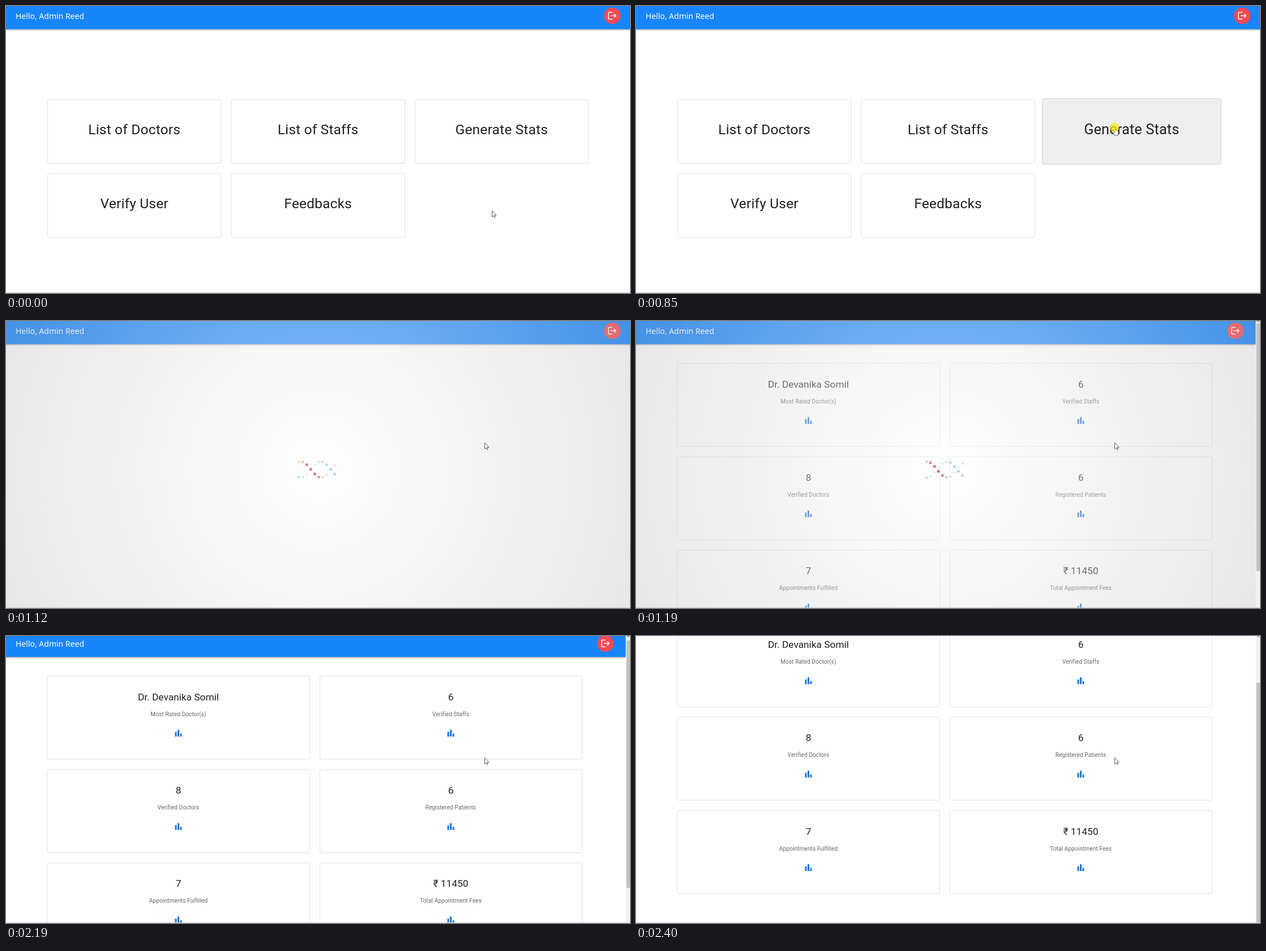
Write an HTML page that moves like this. It is 1102 by 508 pixels and loops after 2940 ms.

```html
<!DOCTYPE html>
<html lang="en">
<head>
<meta charset="utf-8">
<title>Admin dashboard</title>
<style>
  html, body { margin: 0; width: 100%; height: 100%; overflow: hidden; background: #fefefe; }
  #stage { position: relative; width: 1102px; height: 508px; overflow: hidden; background: #fefefe; }
  #stage > * { position: absolute; left: 0; top: 0; }
  svg { display: block; }
  text { font-family: Roboto, sans-serif; fill: #212121; text-anchor: middle; }
  .hello { font: 14px "Noto Sans", "Open Sans", sans-serif; fill: #fff; text-anchor: start; }
  .big { font-size: 24.5px; letter-spacing: .18px; }
  .value { font-size: 17.3px; }
  .label { font-size: 10.08px; letter-spacing: .108px; fill: #666; }
  .card { fill: none; stroke: #e2e2e2; }
  .icon { fill: #1976d2; }
  #bar { filter: drop-shadow(0 1px 1.5px rgba(0, 0, 0, .45)); }
  #overlay { height: 526px; background: radial-gradient(circle, rgba(255, 255, 255, .5), rgba(175, 175, 175, .285)); }
</style>
</head>
<body>
<div id="stage">
  <svg id="pages" width="1102" height="508">
    <g id="home"></g>
    <g id="scroller">
      <g id="stats"></g>
      <g id="header">
        <rect id="bar" x="-10" y="-10" height="51" fill="#1885fb"/>
        <text class="hello" x="17" y="22.5">Hello, Admin Reed</text>
        <g id="logout">
          <circle cy="17.3" r="14.6" fill="#fa4a52"/>
          <path fill="#fff" transform="translate(-9 8.3) scale(.75)" d="M17 7l-1.41 1.41L18.17 11H8v2h10.17l-2.58 2.58L17 17l5-5zM4 5h8V3H4c-1.1 0-2 .9-2 2v14c0 1.1.9 2 2 2h8v-2H4z"/>
        </g>
      </g>
    </g>
  </svg>
  <div id="overlay"></div>
  <svg width="1102" height="508">
    <g id="spinner"></g>
    <g id="scrollbar">
      <rect x="1094.5" width="8" height="508" fill="#f1f1f1"/>
      <path d="M1097 1.2h4l-1-1.2h-2z" fill="#606060"/>
      <rect id="thumb" x="1095.7" width="6.3" height="438" fill="#c1c1c1"/>
    </g>
    <rect y="507" width="1102" height="1" fill="#cfcfcf"/>
    <path id="arrow" d="M0 0V11L2.5 8.8 4.1 12.2 5.7 11.5 4.2 8.1H7.4Z" fill="#fff" stroke="#333" stroke-width=".8"/>
    <path id="hand" d="M-.9 7V1Q0-.6 1 1V5L5 6Q6 6.3 6 7.5V10L4.8 14H-.5L-3.5 9.5Q-4-.2-.9 9Z" fill="#fff" stroke="#333" stroke-width=".8"/>
    <circle id="click" r="8.3" fill="#f7ee10" opacity=".72"/>
  </svg>
</div>
<script>
const LOOP = 2940;
const $ = id => document.getElementById(id);

function add(parent, tag, attrs, text) {
  const node = document.createElementNS("http://www.w3.org/2000/svg", tag);
  for (const key in attrs) node.setAttribute(key, attrs[key]);
  if (text) node.textContent = text;
  return parent.appendChild(node);
}

function show(id, on) { $(id).style.display = on ? "" : "none"; }
function place(id, x, y) { $(id).setAttribute("transform", `translate(${x} ${y})`); }

function homeCard(title, i) {
  const x = 73.5 + (i % 3) * 324.3, y = 165.5 + Math.floor(i / 3) * 131.2;
  const g = add($("home"), "g", {});
  const box = add(g, "rect", { class: "card", x, y, width: 306.5, height: 113, rx: 3 });
  add(g, "text", { class: "big", x: x + 153.2, y: y + 61.5 }, title);
  return { g, box, cx: x + 153.2, cy: y + 56.2 };
}

function statCard([value, label], i) {
  const right = i % 2, x = right ? 554.5 : 72.5, cx = right ? 785.5 : 304.5;
  const y = 75 + Math.floor(i / 2) * 165.3;
  const g = $("stats");
  add(g, "rect", { class: "card", x, y, width: right ? 463 : 464, height: 147, rx: 3 });
  add(g, "text", { class: "value", x: cx, y: y + 42.7 }, value);
  add(g, "text", { class: "label", x: cx, y: y + 70.8 }, label);
  add(g, "path", { class: "icon", d: "M4 9h4v11H4zM10 4h4v16h-4zM16 13h4v7h-4z",
    transform: `translate(${cx - 9} ${y + 92}) scale(.75)` });
}

const cards = ["List of Doctors", "List of Staffs", "Generate Stats", "Verify User", "Feedbacks"].map(homeCard);
const hot = cards[2];
[["Dr. Devanika Somil", "Most Rated Doctor(s)"], ["6", "Verified Staffs"],
 ["8", "Verified Doctors"], ["6", "Registered Patients"],
 ["7", "Appointments Fulfilled"], ["₹ 11450", "Total Appointment Fees"]].forEach(statCard);

const dots = Array.from({ length: 20 }, () => add($("spinner"), "circle", {}));

function drawSpinner(cx, shift) {
  dots.forEach((dot, n) => {
    const i = n % 10, cool = n > 9;
    const angle = Math.PI * (i - .15 + shift) / 5 + (cool ? Math.PI : 0);
    const depth = Math.sin(angle);
    const warm = depth > .3 ? "#d9727a" : "#ecac8c";
    dot.setAttribute("cx", cx - 32 + i * 7.05);
    dot.setAttribute("cy", 263 - 14 * Math.cos(angle));
    dot.setAttribute("r", 2.1 + .5 * depth);
    dot.setAttribute("fill", cool ? "#a5dbe6" : warm);
    dot.setAttribute("opacity", .75 + .25 * depth);
  });
}

// Each step holds until the next; values carry over.
const steps = [
  { at: 0, page: "home", x: 858, y: 362, hover: 0, pointer: "arrow", click: false, veil: 0, phase: 0, scroll: 0 },
  { at: 320, x: 856, y: 337 },
  { at: 390, x: 850, y: 266, pointer: "hand", hover: .1 },
  { at: 450, x: 846, y: 229, hover: .55 },
  { at: 520, x: 845, y: 217, hover: .9 },
  { at: 580, x: 845, y: 215, hover: 1 },
  { at: 850, click: true },
  { at: 980, page: "blank", click: false, pointer: "arrow" },
  { at: 1120, veil: 1, phase: -.4 },
  { at: 1190, page: "stats", phase: 0 },
  { at: 1260, veil: .5, phase: .4 },
  { at: 1330, veil: 0 },
  { at: 2190, scroll: 4 },
  { at: 2260, scroll: 36 },
  { at: 2330, scroll: 77 },
  { at: 2400, scroll: 96.7 }
];

function render(time) {
  const s = Object.assign({}, ...steps.filter(step => step.at <= time));
  const stats = s.page === "stats", width = stats ? 1094.5 : 1102;

  show("home", s.page === "home");
  show("stats", stats);
  show("scrollbar", stats);
  place("scroller", 0, -s.scroll);
  $("thumb").setAttribute("y", 4.5 + s.scroll * .81);
  $("bar").setAttribute("width", stats ? width + 10 : width + 20);
  place("logout", stats ? 1058.7 : 1070.8, 0);

  const k = 1 + .03 * s.hover, shade = (a, b) => Math.round(a + (b - a) * s.hover);
  hot.g.setAttribute("transform", `translate(${hot.cx} ${hot.cy}) scale(${k}) translate(${-hot.cx} ${-hot.cy})`);
  const fill = shade(254, 238), line = shade(226, 212);
  hot.box.style.fill = `rgb(${fill},${fill},${fill})`;
  hot.box.style.stroke = `rgb(${line},${line},${line})`;

  $("overlay").style.width = width + "px";
  $("overlay").style.opacity = s.veil;
  $("spinner").style.opacity = s.veil;
  drawSpinner(stats ? 545 : 549, s.phase);

  show("arrow", s.pointer === "arrow");
  show("hand", s.pointer === "hand");
  show("click", s.click);
  place("arrow", s.x + .5, s.y + .5);
  place("hand", s.x + 1, s.y);
  place("click", s.x, s.y);
}

const start = performance.now();
function tick() {
  render((performance.now() - start) % LOOP);
  requestAnimationFrame(tick);
}
tick();
</script>
</body>
</html>
```
